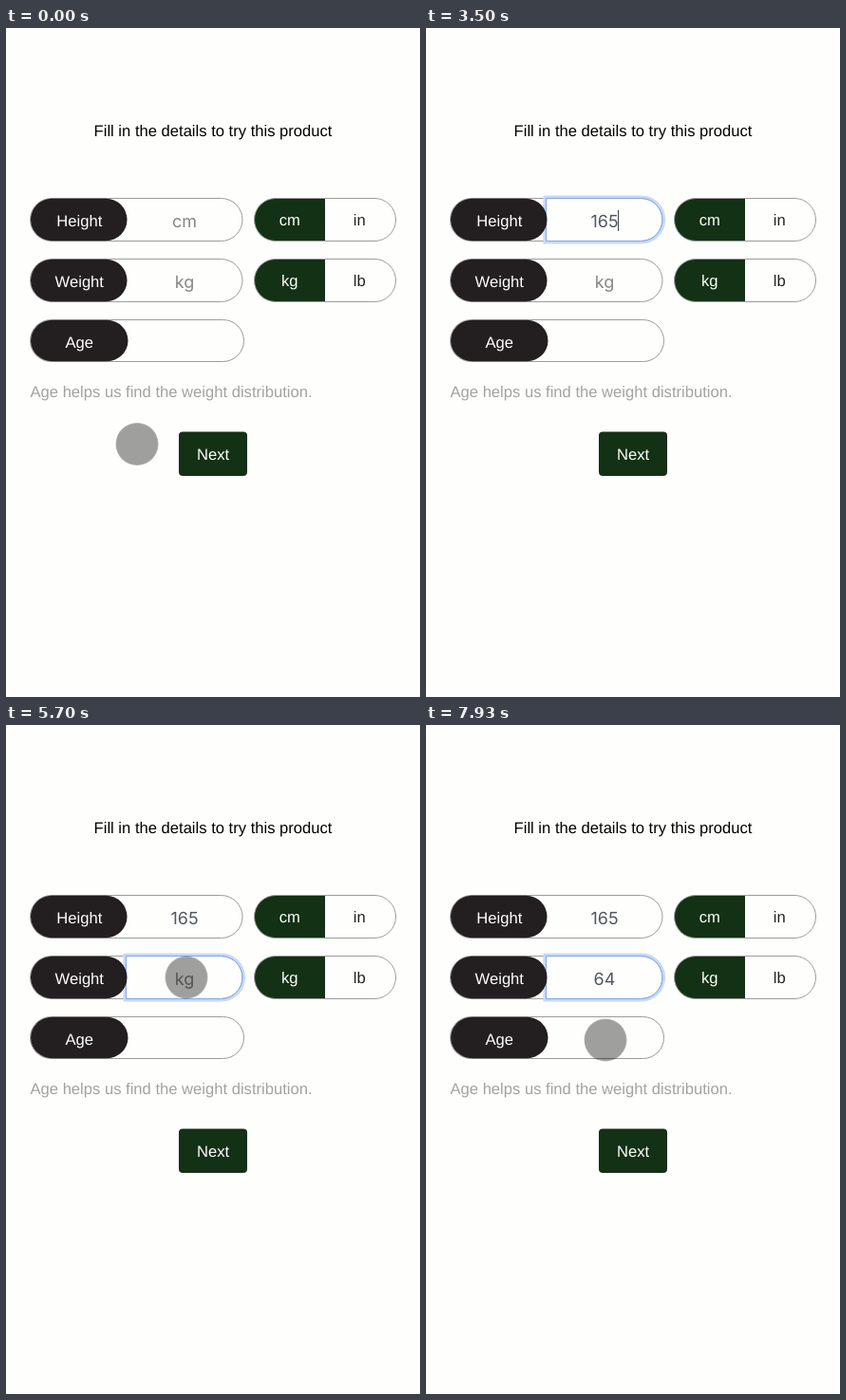
These frames come from a looping animation (436x705 px, 8000 ms). An HTML page:

```html
<!DOCTYPE html>
<html lang="en">
<head>
<meta charset="utf-8">
<title>Details form</title>
<style>
  html, body { margin: 0; width: 100%; height: 100%; overflow: hidden; background: #fefefd; }
  svg { display: block; width: 436px; height: 705px; }
  text { font: 16.6px "Liberation Sans", Arial, sans-serif; text-rendering: geometricPrecision; }
  .mid { text-anchor: middle; }
  .light { fill: #fff; }
  .field { font: 18px Inter, sans-serif; text-anchor: middle; }
  .line { fill: none; stroke: #9c9c9c; }
  .label { fill: #231f20; }
  .green { fill: #133114; }
</style>
</head>
<body>
<svg id="stage" viewBox="0 0 436 705">
  <rect width="436" height="705" fill="#fefefd"/>
  <text class="mid" x="218" y="114">Fill in the details to try this product</text>
  <g id="rows"></g>
  <text x="25.5" y="389" fill="#a2a2a2">Age helps us find the weight distribution.</text>
  <rect class="green" x="182.5" y="426" width="71" height="45.5" rx="3" stroke="#1d2a1d"/>
  <text class="mid light" x="218" y="454.5">Next</text>
  <rect id="caret" width="1" height="22" fill="#3f4650"/>
  <g id="pointer">
    <circle r="22.5" fill="#000" fill-opacity=".3"/>
    <circle r="21.7" fill="#000" fill-opacity=".11"/>
  </g>
</svg>
<script>
const LOOP = 8000;
const $ = id => document.getElementById(id);
const rows = $('rows'), caret = $('caret'), pointer = $('pointer');

// Input outline: square on the left, rounded on the right
const inputPath = (y, grow) => {
  const l = 126.5 - grow, r = 249 + grow, t = y - grow, b = y + 45 + grow, k = 22.5 + grow;
  return `M${l} ${t}H${r - k}A${k} ${k} 0 0 1 ${r - k} ${b}H${l}Z`;
};

const labelled = (name, y, right, height) => `
  <rect class="label" x="26" y="${y + .3}" width="${right - 26}" height="${height - .6}" rx="22"/>
  <text class="mid light" x="77.3" y="${y + 29.5}">${name}</text>`;

const unitSwitch = (y, on, off) => `
  <path class="green" d="M336 ${y}H284A22.5 22.5 0 0 0 284 ${y + 45}H336Z"/>
  <rect class="line" x="261.5" y="${y}" width="149" height="45" rx="22.5"/>
  <text class="mid light" x="298.8" y="${y + 28.3}">${on}</text>
  <text class="mid" x="372.3" y="${y + 28.3}" fill="#222">${off}</text>`;

const inputRow = (id, name, y, on, off) => `
  <rect class="line" x="25.5" y="${y}" width="223.5" height="45" rx="22.5"/>
  <g id="${id}Ring" fill="none">
    <path d="${inputPath(y, 1.6)}" stroke="#c6daf9" stroke-width="3"/>
    <path d="${inputPath(y, 0)}" stroke="#86a6dc"/>
  </g>
  ${labelled(name, y, 127.5, 45)}
  <text class="field" id="${id}Text" x="188" y="${y + 30.5}"></text>
  ${unitSwitch(y, on, off)}`;

rows.innerHTML =
  inputRow('height', 'Height', 179.5, 'cm', 'in') +
  inputRow('weight', 'Weight', 243.5, 'kg', 'lb') +
  '<rect class="line" x="25.5" y="307.5" width="225" height="44" rx="22"/>' +
  labelled('Age', 307.5, 128.5, 44);

// Focus and typing: time, field, value, caret position
const edits = [
  [1760, 'height', '', 188],
  [2830, 'height', '1', 193],
  [3230, 'height', '16', 198],
  [3500, 'height', '165', 202],
  [5200, 'weight', '', 188],
  [6930, 'weight', '6', 194],
  [7360, 'weight', '64', 199]
];
const hints = { height: 'cm', weight: 'kg' };
const caretTop = { height: 192, weight: 256 };

const clamp = v => Math.max(0, Math.min(1, v));
const span = (t, a, b) => clamp((t - a) / (b - a));
const lerp = (a, b, p) => a + (b - a) * p;
const easeOut = (p, n) => 1 - (1 - p) ** n;
const fade = p => p * p * (3 - 2 * p);

// Downward move that swings out to the right early on
function swing(p, x0, y0, x1, y1) {
  const q = easeOut(p, 1.2);
  return [lerp(x0, x1, q) + 9.8 * 6.75 * q * (1 - q) ** 2, lerp(y0, y1, q)];
}

function pointerAt(t) {
  if (t < 100) return [138, 438.5];
  if (t < 130) return [141, 436];
  if (t < 4400) {
    const p = span(t, 945, 1500);
    return [lerp(144.3, 189, easeOut(p, 2.5)), lerp(433, 204, easeOut(p, 2))];
  }
  if (t < 7360) return swing(span(t, 4400, 5000), 189, 204, 190, 266);
  return swing(span(t, 7360, 7930), 190, 266, 189, 332);
}

function setField(id, value) {
  const text = $(id + 'Text');
  text.textContent = value || hints[id];
  text.setAttribute('fill', value ? '#51575e' : '#858585');
}

function draw(t) {
  const values = { height: '', weight: '' };
  let last = null;
  for (const e of edits) {
    if (t < e[0]) break;
    values[e[1]] = e[2];
    last = e;
  }
  setField('height', values.height);
  setField('weight', values.weight);

  const toHeight = fade(span(t, 1760, 1920)), toWeight = fade(span(t, 5200, 5360));
  $('heightRing').setAttribute('opacity', toHeight * (1 - toWeight));
  $('weightRing').setAttribute('opacity', toWeight);

  const lit = last && Math.floor((t - last[0]) / 500) % 2 === 0;
  caret.setAttribute('visibility', lit ? 'visible' : 'hidden');
  if (lit) {
    caret.setAttribute('x', last[3]);
    caret.setAttribute('y', caretTop[last[1]]);
  }

  // The pointer hides while typing
  const hidden = (t >= 2900 && t < 4400) || (t >= 7000 && t < 7390);
  pointer.setAttribute('visibility', hidden ? 'hidden' : 'visible');
  pointer.setAttribute('transform', `translate(${pointerAt(t).map(v => v.toFixed(2))})`);
}

function tick() {
  draw(performance.now() % LOOP);
  requestAnimationFrame(tick);
}
tick();
</script>
</body>
</html>
```
